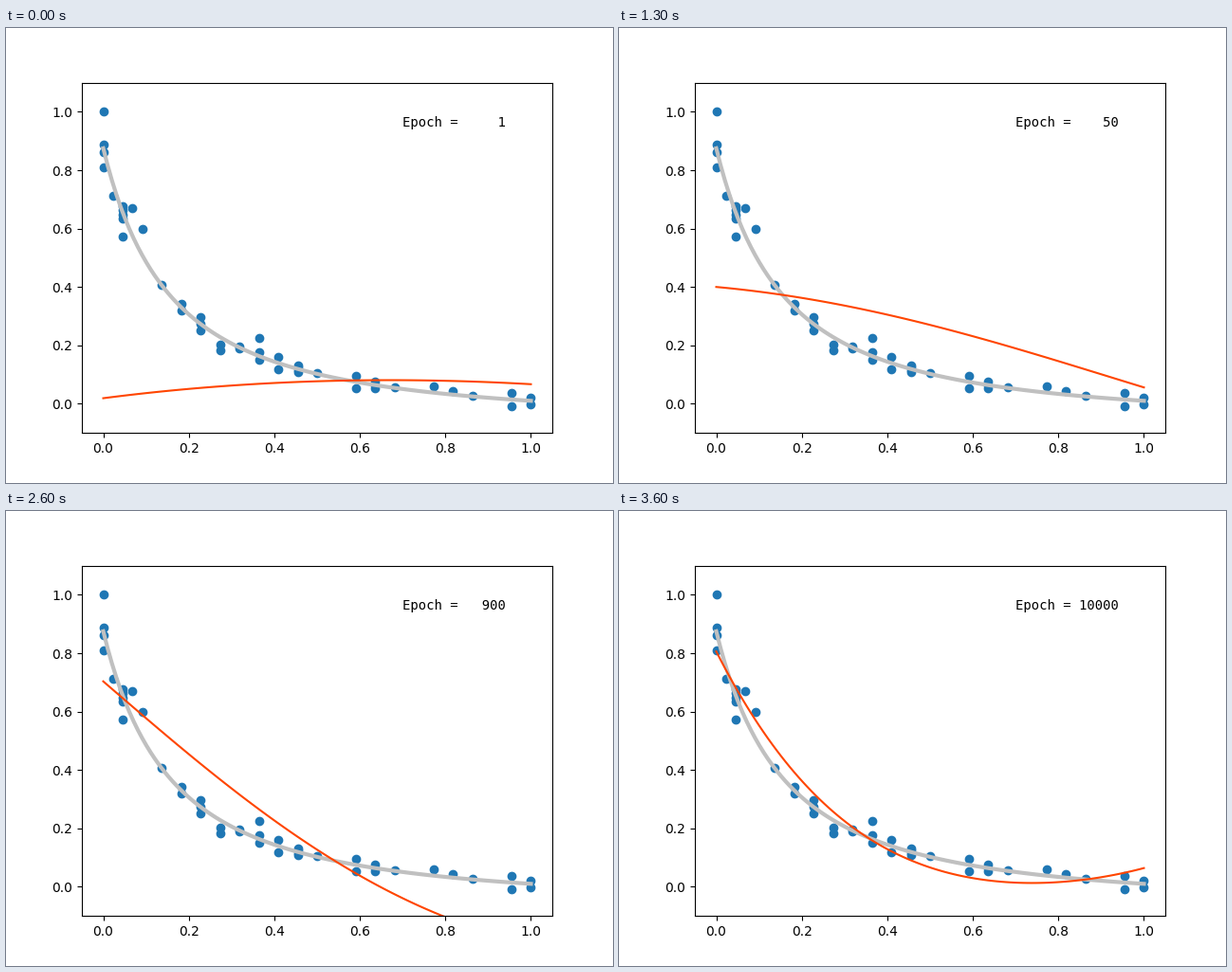
A matplotlib script that plays this animation: 640x480 px, repeating every 3.7 s.

```python
import numpy as np
import matplotlib.pyplot as plt
from matplotlib.animation import FuncAnimation

FRAMES = 37

# Key shapes of the fit at x = 0, 1/4, 1/2, 3/4, 1
KEYS = {
    1: [0.019, 0.057, 0.077, 0.080, 0.067],
    10: [0.163, 0.204, 0.222, 0.217, 0.194],
    50: [0.400, 0.350, 0.270, 0.168, 0.056],
    500: [0.672, 0.401, 0.139, -0.072, -0.205],
    4000: [0.745, 0.342, 0.111, -0.004, -0.055],
    10000: [0.806, 0.288, 0.066, 0.013, 0.064],
}

# Grid steps of 1/22 grouped by how many readings each one holds
GROUPS = {1: (3, 11, 15, 17, 18, 19), 2: (0, 4, 7, 8, 9, 13, 21, 22),
          3: (5, 14), 4: (1, 10)}
STRAYS = [(0, 1.0), (0, 0.81), (0.5, 0.711), (1, 0.573), (1.5, 0.67),
          (2, 0.598), (6, 0.202), (6, 0.182), (8, 0.225)]


def trend(x):
    return 0.10747 / (x + 0.235) ** 1.5 - 0.0683


def readings():
    """Columns of points spread evenly about the trend, plus the strays."""
    pts = [(step / 22, y) for step, y in STRAYS]
    for count, steps in GROUPS.items():
        for step in steps:
            spread = 0.012 + 0.01 * np.sin(np.pi * step / 2)
            for d in np.linspace(spread, -spread, count):
                pts.append((step / 22, trend(step / 22) + d))
    return pts


def progress(epoch):
    return np.log(np.asarray(epoch) + 10.0)


x = np.linspace(0, 1, 100)
knots = progress(list(KEYS))
levels = np.array(list(KEYS.values()))
slopes = np.gradient(levels, knots, axis=0, edge_order=2)


def fitted(epoch):
    """Ease between key shapes, then draw a quartic through the result."""
    u = progress(epoch)
    i = int(np.clip(np.searchsorted(knots, u) - 1, 0, len(knots) - 2))
    h = knots[i + 1] - knots[i]
    t = (u - knots[i]) / h
    y = ((1 + 2 * t) * (1 - t) ** 2 * levels[i]
         + t * (1 - t) ** 2 * h * slopes[i]
         + t * t * (3 - 2 * t) * levels[i + 1]
         + t * t * (t - 1) * h * slopes[i + 1])
    return np.polyval(np.polyfit(np.linspace(0, 1, 5), y, 4), x)


fig, ax = plt.subplots(figsize=(6.4, 4.8), dpi=100)
ax.scatter(*zip(*readings()))
ax.plot(x, trend(x), color="silver", lw=3)
curve, = ax.plot([], [], color="orangered", lw=1.5)
label = ax.text(0.7, 0.95, "", family="DejaVu Sans Mono", size=10)
ax.set_xlim(-0.05, 1.05)
ax.set_ylim(-0.1, 1.1)


def update(frame):
    # 1..9, 10..90, 100..900 and so on
    epoch = (frame % 9 + 1) * 10 ** (frame // 9)
    curve.set_data(x, fitted(epoch))
    label.set_text(f"Epoch = {epoch:5d}")
    return curve, label


anim = FuncAnimation(fig, update, frames=FRAMES, interval=100, repeat=True)
plt.show()
```
